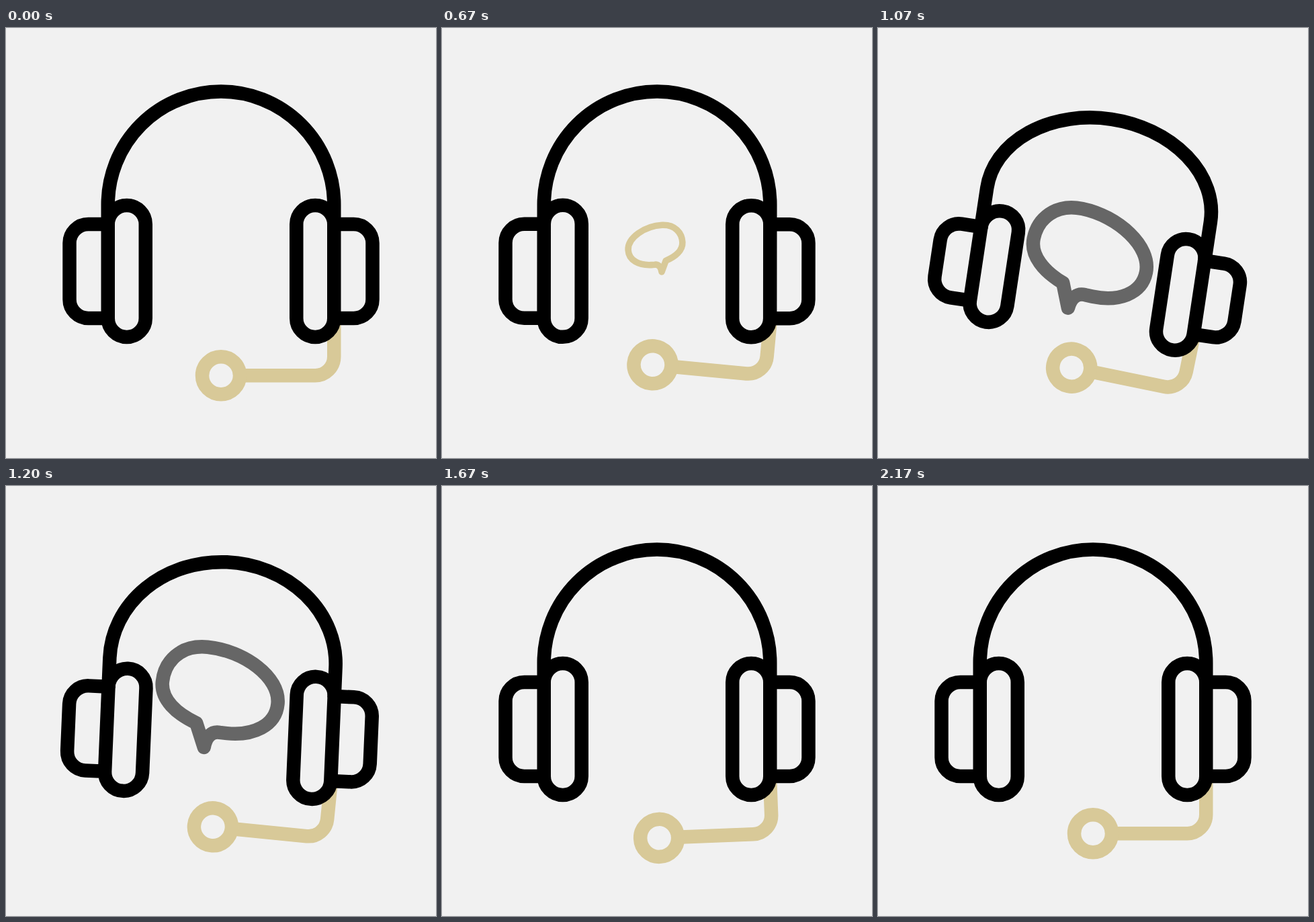
Recreate the animation shown at these times as an HTML page. Size 640 by 640 pixels, loop 2500 ms.

```html
<!DOCTYPE html>
<html lang="en">
<head>
<meta charset="utf-8">
<title>Headset</title>
<style>
  html, body { margin: 0; width: 100%; height: 100%; overflow: hidden; background: #f1f1f1; }
  svg { display: block; width: 100%; height: 100%; }
  path, circle { fill: none; stroke-width: 20.5; }
  .gold { stroke: #d8c998; }
  .grey { stroke: #666; }
  .black { stroke: #000; }
  .bubble { stroke-linejoin: round; }
</style>
</head>
<body>
<svg viewBox="0 0 640 640">
  <defs>
    <path id="speech" class="bubble" transform="rotate(3.06 320 320)"
      d="M300 363L285 328C254 317 229 298 229 272C229 242 250 214 291 214C345 214 403 248 403 288C403 321 371 339 332 339L321 338.8C309 338 301 347 300 363Z"/>
  </defs>
  <g id="head">
    <g id="mic" class="gold">
      <path d="M488.25 437V489.25A28 28 0 0 1 460.25 517.25H347"/>
      <circle cx="320" cy="517.25" r="28"/>
    </g>
    <g id="goldBubble" class="gold"><use href="#speech"/></g>
    <g id="greyBubble" class="grey"><use href="#speech"/></g>
    <g class="black">
      <path id="band"/>
      <path id="left"/>
      <path id="right" transform="matrix(-1 0 0 1 640 0)"/>
    </g>
  </g>
</svg>
<script>
const LOOP = 2500;
const el = id => document.getElementById(id);
const set = (id, name, value) => el(id).setAttribute(name, value);

// Each track lists [time, value] pairs joined by a sine ease.
const tracks = {
  tilt: [[655, 0], [1000, 9.7], [1370, -3.06], [1550, 0]],
  nod: [[680, 0], [1000, 32], [1370, 0]],
  squash: [[788, 0], [1000, 43], [1370, 0]],
  drop: [[672, 0], [1000, 65], [1370, 0]],
  swing: [[470, 0], [800, 8], [1080, 3], [1300, 3.4], [1600, -3.1], [1965, 6], [2168, 0]],
  gold: [[580, 0], [770, 1], [860, 1], [970, 0]],
  grey: [[940, 0], [1060, 1], [1390, 1], [1520, 0]]
};

function at(keys, t) {
  if (t <= keys[0][0]) return keys[0][1];
  for (let i = 1; i < keys.length; i++) {
    const [t0, a] = keys[i - 1], [t1, b] = keys[i];
    if (t < t1) return a + (b - a) * (1 - Math.cos(Math.PI * (t - t0) / (t1 - t0))) / 2;
  }
  return keys[keys.length - 1][1];
}

// One ear: the pad and its outer cup, both with fixed bottom ends.
function ear(nod) {
  const top = 292 + nod;
  return `M151.75 ${top}a28 28 0 0 1 56 0V432a28 28 0 0 1 -56 0Z` +
    `M151.75 ${top}H122.5a28 28 0 0 0 -28 28V404a28 28 0 0 0 28 28H151.75`;
}

function bubble(id, size, drop, flip) {
  set(id, "visibility", size > 0.01 ? "visible" : "hidden");
  set(id, "transform", `translate(317.7 ${364 + drop}) scale(${flip * size} ${size}) translate(-317.7 -364)`);
}

function draw(t) {
  const v = {};
  for (const name in tracks) v[name] = at(tracks[name], t);
  set("head", "transform", `rotate(${v.tilt} 320 320)`);
  set("mic", "transform", `rotate(${v.swing} 488.25 441)`);
  const end = 294 + v.nod;
  set("band", "d", `M151.75 ${end}V262.75A168.25 ${168.25 - v.squash} 0 0 1 488.25 262.75V${end}`);
  set("left", "d", ear(v.nod));
  set("right", "d", ear(v.nod));
  bubble("goldBubble", v.gold, v.drop, -1);
  bubble("greyBubble", v.grey, v.drop, 1);
}

const start = performance.now();
function tick() {
  draw((performance.now() - start) % LOOP);
  requestAnimationFrame(tick);
}
tick();
</script>
</body>
</html>
```
